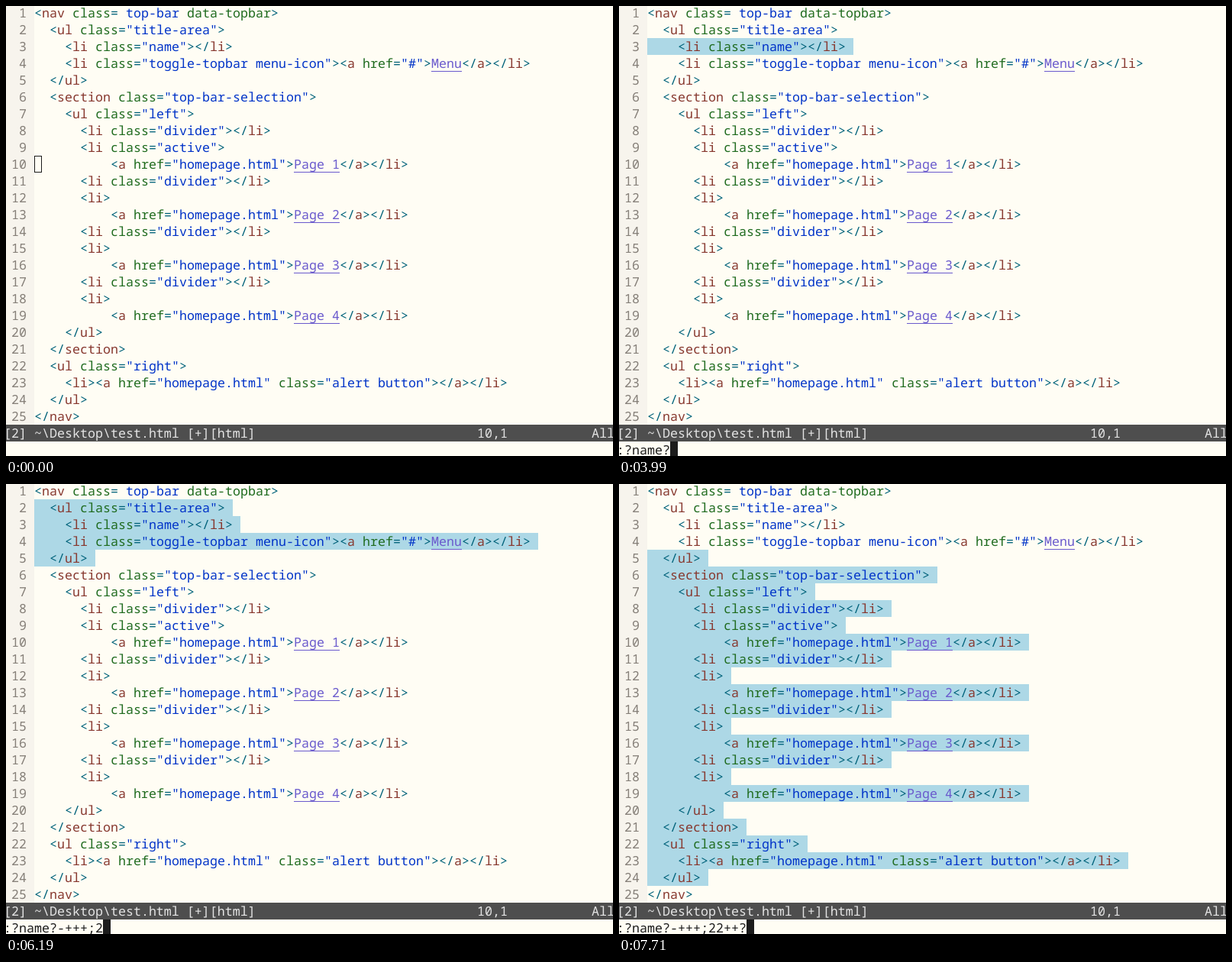
Write an HTML page that moves like this. It is 795 px wide and 589 px high and loops after 8000 ms.

```html
<!DOCTYPE html>
<html lang="en">
<head>
<meta charset="utf-8">
<title>Editor range preview</title>
<style>
  html, body { margin: 0; width: 100%; height: 100%; overflow: hidden; background: #fffdf4; }
  svg { display: block; }
  text {
    font: 16.667px "Noto Sans Mono", "DejaVu Sans Mono", monospace;
    font-variant-ligatures: none;
    text-rendering: geometricPrecision;
  }
</style>
</head>
<body>
<svg id="stage" width="795" height="589" viewBox="0 0 795 589">
  <rect width="37" height="548" fill="#f7f4ed"/>
  <rect y="548" width="795" height="22" fill="#4e4e4e"/>
  <g id="marks"></g>
  <g id="code"></g>
  <g id="over"></g>
</svg>
<script>
const LOOP = 8000, CELL = 10, ROW = 22, LEFT = -3, TOP = -2, GUTTER = 4;
const INK = '#1c1c1c', STATUS = '#e4e4e4';
// bracket, string, tag, link, attribute
const COLORS = ['#00627a', '#0033c8', '#87382f', '#6a5acd', '#1f6b1f'];

const item = n => `      <li class="divider"></li>
      <li${n === 1 ? ' class="active"' : ''}>
          <a href="homepage.html">Page ${n}</a></li>`;

const lines = `<nav class= top-bar data-topbar>
  <ul class="title-area">
    <li class="name"></li>
    <li class="toggle-topbar menu-icon"><a href="#">Menu</a></li>
  </ul>
  <section class="top-bar-selection">
    <ul class="left">
${[1, 2, 3, 4].map(item).join('\n')}
    </ul>
  </section>
  <ul class="right">
    <li><a href="homepage.html" class="alert button"></a></li>
  </ul>
</nav>`.split('\n');

// time, command line, first and last marked line, searched text
const steps = [
  [0, 'hollow'],
  [200, 'block'],
  [1820, ':'],
  [2280, ':?'],
  [2660, ':?n', 6, 6, 'n'],
  [2990, ':?na', 3, 3, 'na'],
  [3350, ':?nam', 3, 3, 'nam'],
  [3630, ':?name', 3, 3, 'nam'],
  [3680, ':?name', 3, 3, 'name'],
  [3990, ':?name?', 3, 3],
  [4370, ':?name?-', 2, 2],
  [4700, ':?name?-+', 3, 3],
  [5060, ':?name?-++', 4, 4],
  [5450, ':?name?-+++', 5, 5],
  [5810, ':?name?-+++;', 5, 5],
  [6190, ':?name?-+++;2', 2, 5],
  [6550, ':?name?-+++;22', 2, 5],
  [6600, ':?name?-+++;22', 5, 22],
  [6970, ':?name?-+++;22+', 5, 23],
  [7350, ':?name?-+++;22++', 5, 24],
  [7710, ':?name?-+++;22++?', 5, 24]
];

const [marks, code, over] = ['marks', 'code', 'over'].map(id => document.getElementById(id));
const xAt = col => LEFT + col * CELL;
const yAt = row => TOP + (row - 1) * ROW;

function add(parent, tag, attrs) {
  const el = document.createElementNS('http://www.w3.org/2000/svg', tag);
  for (const key in attrs) el.setAttribute(key, attrs[key]);
  return parent.appendChild(el);
}

function write(parent, row, col, str, fill) {
  add(parent, 'text', { x: xAt(col), y: yAt(row) + 17, fill }).textContent = str;
}

function fillCells(parent, row, col, count, fill) {
  add(parent, 'rect', { x: xAt(col), y: yAt(row), width: count * CELL, height: ROW, fill });
}

function drawLine(line, i) {
  const row = i + 1, num = String(row);
  write(code, row, 3 - num.length, num, '#857f78');
  const token = /(<\/?|[=>])|("[^"]*"|(?<== )top-bar)|((?<=<\/?)\w+)|((?<=>)[^<>]+)|([\w-]+)/g;
  for (const m of line.matchAll(token)) {
    const kind = m.slice(1).findIndex(g => g !== undefined);
    const col = GUTTER + m.index;
    write(code, row, col, m[0], COLORS[kind]);
    if (kind === 3) {
      add(code, 'rect', {
        x: xAt(col), y: yAt(row) + ROW - 1,
        width: m[0].length * CELL, height: 1, fill: COLORS[kind]
      });
    }
  }
}

function drawMatches(row, word) {
  const line = lines[row - 1];
  for (let at = line.indexOf(word); at >= 0; at = line.indexOf(word, at + 1)) {
    fillCells(over, row, GUTTER + at, word.length, '#ffb04c');
    write(over, row, GUTTER + at, word, INK);
  }
}

function show([, cmd, first, last, word]) {
  marks.replaceChildren();
  over.replaceChildren();
  if (cmd === 'hollow' || cmd === 'block') {
    add(over, 'rect', {
      x: xAt(GUTTER) + 0.5, y: yAt(10) + 0.5, width: CELL - 1, height: ROW - 1,
      fill: cmd === 'block' ? INK : 'none', stroke: INK
    });
    return;
  }
  for (let row = first; row <= last; row++) {
    fillCells(marks, row, GUTTER, lines[row - 1].length + 1, '#add8e6');
    if (word) drawMatches(row, word);
  }
  write(over, 27, 0, cmd, INK);
  fillCells(over, 27, cmd.length, 1, INK);
}

lines.forEach(drawLine);
write(code, 26, 0, '[2] ~\\Desktop\\test.html [+][html]', STATUS);
write(code, 26, 62, '10,1', STATUS);
write(code, 26, 77, 'All', STATUS);

let current;
function tick() {
  const t = performance.now() % LOOP;
  const step = steps.findLast(s => s[0] <= t);
  if (step !== current) show(current = step);
  requestAnimationFrame(tick);
}
tick();
</script>
</body>
</html>
```
